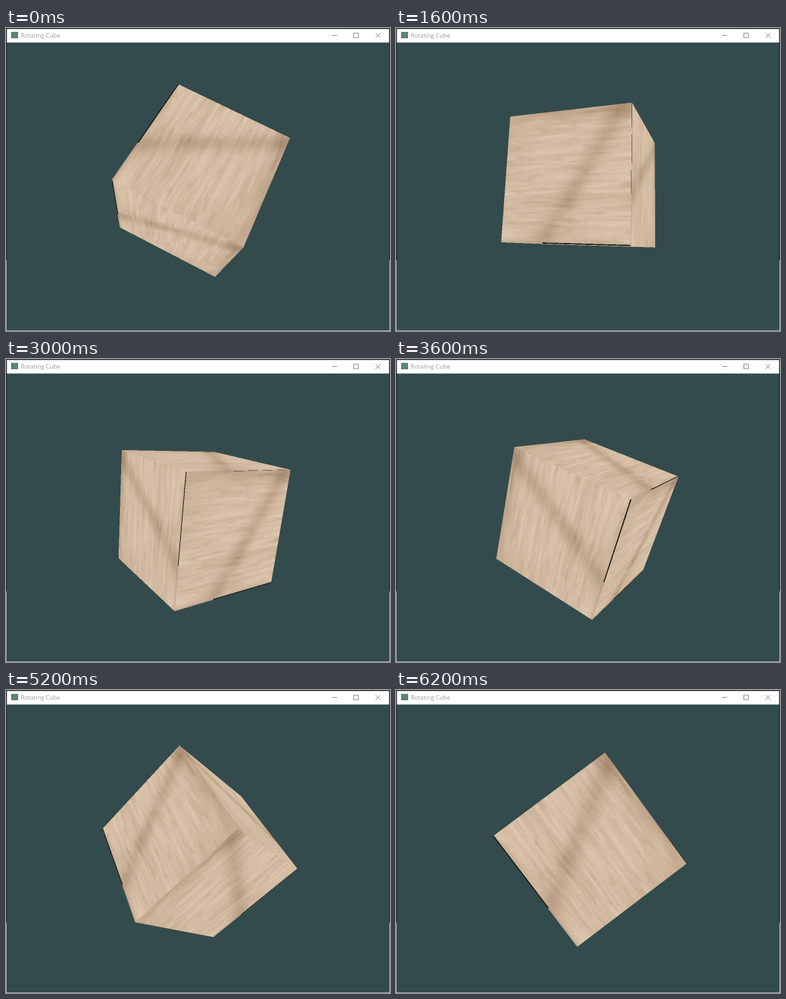
Recreate the animation shown at these times as an HTML page with a canvas. Size 600 by 472 pixels, loop 6400 ms.

```html
<!DOCTYPE html>
<html lang="en">
<head>
<meta charset="utf-8">
<title>Rotating Cube</title>
<style>
html, body { margin: 0; width: 100%; height: 100%; overflow: hidden; background: #334b4c; }
#stage { position: relative; width: 600px; height: 472px; }
canvas, svg { position: absolute; left: 0; top: 0; display: block; }
text { font: 9.4px "Open Sans", "Noto Sans", sans-serif; fill: #999; }
</style>
</head>
<body>
<div id="stage">
  <canvas id="view" width="600" height="472"></canvas>
  <svg width="600" height="472" viewBox="0 0 600 472">
    <rect width="600" height="22.6" fill="#fff"/>
    <rect width="600" height="1.5" fill="#222"/>
    <path d="M.7 0V362M599.3 0V362" stroke="#2b2b2b" stroke-width="1.4"/>
    <path d="M.5 362V472M599.5 362V472M0 471.5H600" stroke="#a9afaf"/>
    <rect x="8" y="6" width="11" height="10" fill="#5b8379"/>
    <text x="23" y="15">Rotating Cube</text>
    <g fill="none" stroke="#777" stroke-width=".9">
      <path d="M509.5 11.5H517.5M577.5 8L585 15.5M585 8L577.5 15.5"/>
      <rect x="543.5" y="8" width="7" height="7"/>
    </g>
  </svg>
</div>
<script>
const LOOP = 6400, STEP = 200;
const START_ANGLE = -94, STEP_ANGLE = 8.94;
const FOCAL = 540.8, CX = 299.5, CY = 246.9, DIST = 3;
const BACK = [51, 75, 76];
const SIZE = 256;
const BOX = { x: 130, y: 75, w: 350, h: 350 };

const clamp = (x, lo, hi) => Math.min(hi, Math.max(lo, x));
const smooth = x => x * x * (3 - 2 * x);
const ramp = (a, b, x) => smooth(clamp((x - a) / (b - a), 0, 1));
const mix = (a, b, t) => a + (b - a) * t;

function hash(i, j) {
  const s = Math.sin(i * 127.1 + j * 311.7) * 43758.5453;
  return s - Math.floor(s);
}

function noise(x, y) {
  const i = Math.floor(x), j = Math.floor(y);
  const a = smooth(x - i), b = smooth(y - j);
  return mix(mix(hash(i, j), hash(i + 1, j), a),
             mix(hash(i, j + 1), hash(i + 1, j + 1), a), b);
}

// Pale wood: fine grain along u, a soft diagonal shadow, a dark seam at v = 0
function wood(u, v) {
  if (v < 2 / SIZE && u > 0.35) return [24, 25, 22];
  const wavy = v + 0.008 * noise(u * 3, v * 3);
  const grain = 0.3 * noise(u * 2, wavy * 14) + 0.3 * noise(u * 4 + 9, wavy * 40)
    + 0.25 * noise(u * 7 + 31, wavy * 85) + 0.15 * noise(u * 90, v * 120);
  const off = (u - 0.34 - 0.6 * v) / 0.09;
  const shadow = Math.exp(-off * off) * mix(0.16, 0.32, noise(u * 5 + 5, v * 16));
  const rim = 0.25 * ramp(0.84, 1, v) + 0.08 * ramp(0.07, 0, v);
  const fleck = 0.1 * ramp(0.72, 1, noise(u * 9 + 70, wavy * 40));
  const tone = clamp(0.74 + (grain - 0.5) * 0.5 - shadow - rim - fleck, 0, 1);
  return [mix(150, 234, tone), mix(121, 213, tone), mix(94, 188, tone)];
}

const texture = new Uint8ClampedArray(SIZE * SIZE * 3);
for (let j = 0; j < SIZE; j++) {
  for (let i = 0; i < SIZE; i++) {
    texture.set(wood((i + 0.5) / SIZE, (j + 0.5) / SIZE).map(Math.round), (j * SIZE + i) * 3);
  }
}

// Rotation about the axis (1, 2, 0)
function rotation(deg) {
  const c = Math.cos(deg * Math.PI / 180), s = Math.sin(deg * Math.PI / 180);
  const kx = 1 / Math.sqrt(5), ky = 2 * kx, n = 1 - c;
  return [
    [c + kx * kx * n, kx * ky * n, ky * s],
    [kx * ky * n, c + ky * ky * n, -kx * s],
    [-ky * s, kx * s, c]
  ];
}

const dir = [0, 0, 0];

// Texture offset where the ray through (px, py) meets the cube, or -1
function trace(px, py, m, eye) {
  const x = (px - CX) / FOCAL, y = (CY - py) / FOCAL;
  let near = -Infinity, far = Infinity, axis = 0;
  for (let k = 0; k < 3; k++) {
    const d = m[0][k] * x + m[1][k] * y - m[2][k];
    dir[k] = d;
    const half = 0.5 / Math.abs(d), mid = -eye[k] / d;
    if (mid - half > near) { near = mid - half; axis = k; }
    far = Math.min(far, mid + half);
  }
  if (near > far) return -1;
  const at = k => eye[k] + dir[k] * near;
  const u = 0.5 + at(axis === 0 ? 1 : 0);
  const v = axis === 2 ? 0.5 + at(1) : 0.5 - at(2);
  const i = clamp(Math.floor(u * SIZE), 0, SIZE - 1);
  const j = clamp(Math.floor(v * SIZE), 0, SIZE - 1);
  return (j * SIZE + i) * 3;
}

const ctx = document.getElementById("view").getContext("2d");
const image = ctx.createImageData(BOX.w, BOX.h);
ctx.fillStyle = `rgb(${BACK})`;
ctx.fillRect(0, 0, 600, 472);

function draw(deg) {
  const m = rotation(deg), eye = m[2].map(e => e * DIST);
  const out = image.data;
  for (let y = 0, p = 0; y < BOX.h; y++) {
    for (let x = 0; x < BOX.w; x++, p += 4) {
      let r = 0, g = 0, b = 0;
      for (let q = 0; q < 4; q++) {
        const o = trace(BOX.x + x + 0.25 + (q & 1) / 2, BOX.y + y + 0.25 + (q >> 1) / 2, m, eye);
        r += o < 0 ? BACK[0] : texture[o];
        g += o < 0 ? BACK[1] : texture[o + 1];
        b += o < 0 ? BACK[2] : texture[o + 2];
      }
      out[p] = r / 4;
      out[p + 1] = g / 4;
      out[p + 2] = b / 4;
      out[p + 3] = 255;
    }
  }
  ctx.putImageData(image, BOX.x, BOX.y);
}

const start = performance.now();
let shown = -1;

function tick() {
  const step = Math.floor(((performance.now() - start) % LOOP) / STEP);
  if (step !== shown) {
    shown = step;
    draw(START_ANGLE + step * STEP_ANGLE);
  }
  requestAnimationFrame(tick);
}
tick();
</script>
</body>
</html>
```
